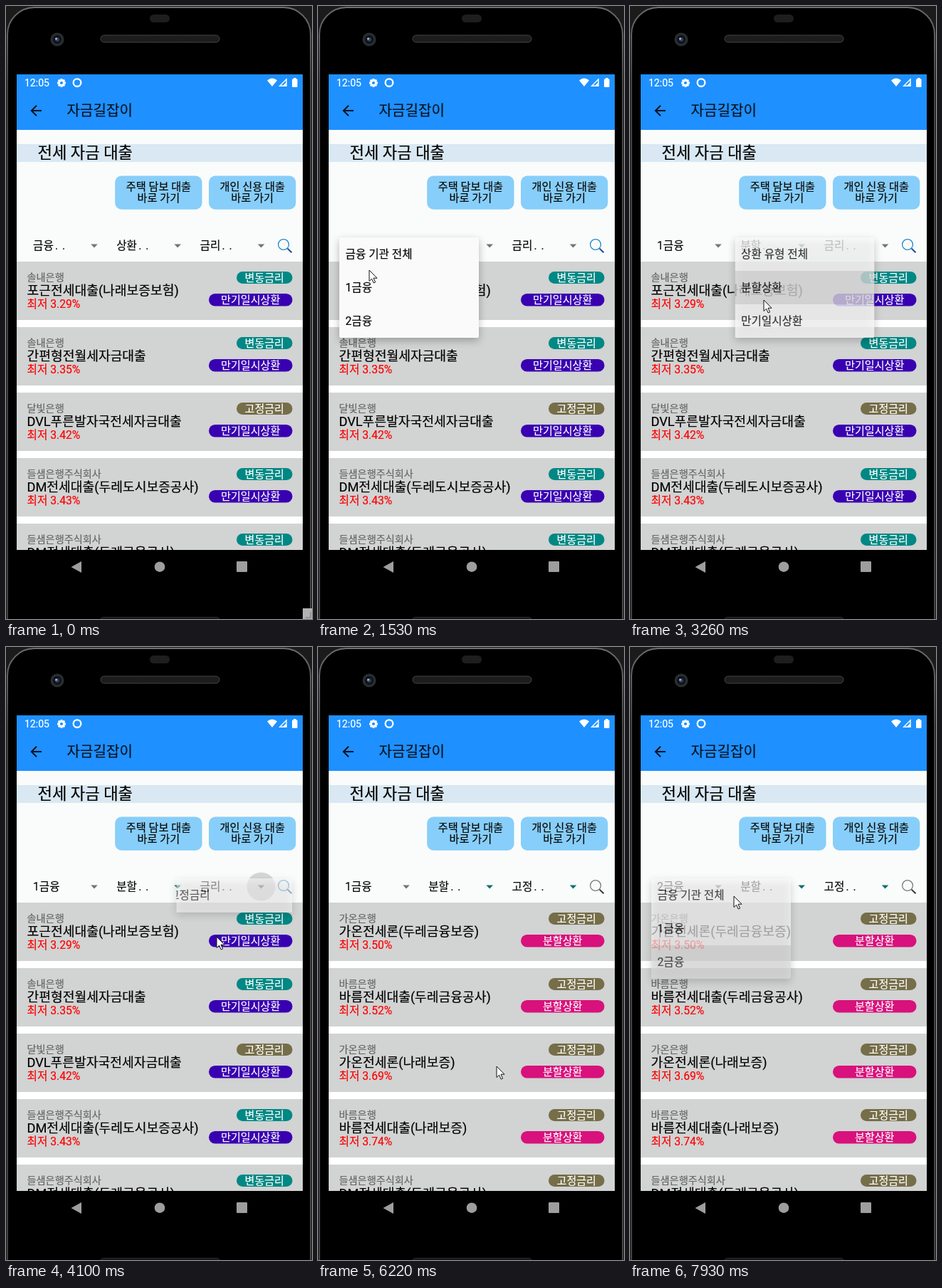
Write an HTML page that moves like this. It is 430 px wide and 861 px high and loops after 8000 ms.

```html
<!DOCTYPE html>
<html lang="ko">
<head>
<meta charset="utf-8">
<title>전세 자금 대출</title>
<style>
html, body { margin: 0; width: 100%; height: 100%; overflow: hidden; background: #000; }
svg { display: block; width: 430px; height: 861px; }
text { font-family: Roboto, 'Noto Sans CJK KR', 'Noto Sans CJK', sans-serif; white-space: pre; stroke-width: .2px; }
#shade { filter: blur(6px); }
</style>
</head>
<body>
<svg id="stage" viewBox="0 0 430 861" xmlns="http://www.w3.org/2000/svg"></svg>
<script>
const LOOP = 8000;
const ROW = 47, TOP = 325;
const SEARCHED = 5210;

const text = (x, y, size, str, fill = '#0a0a0a', anchor = 'start') =>
  `<text x="${x}" y="${y}" font-size="${size}" fill="${fill}" stroke="${fill}" text-anchor="${anchor}">${str}</text>`;
const rect = (x, y, w, h, fill, r = 0, more = '') =>
  `<rect x="${x}" y="${y}" width="${w}" height="${h}" rx="${r}" fill="${fill}" ${more}/>`;
const circle = (x, y, r, fill, more = '') =>
  `<circle cx="${x}" cy="${y}" r="${r}" fill="${fill}" ${more}/>`;
const path = (d, fill, more = '') => `<path d="${d}" fill="${fill}" ${more}/>`;

const RATES = { 변동금리: '#008884', 고정금리: '#756e49' };
const REPAY = { 만기일시상환: '#3900b2', 분할상환: '#d8117c' };

const last = ['들샘은행주식회사', 'DM전세대출(두레금융공사)', '3.45'];
const before = [
  ['솔내은행', '포근전세대출(나래보증보험)', '3.29', '변동금리'],
  ['솔내은행', '간편형전월세자금대출', '3.35', '변동금리'],
  ['달빛은행', 'DVL푸른발자국전세자금대출', '3.42', '고정금리'],
  ['들샘은행주식회사', 'DM전세대출(두레도시보증공사)', '3.43', '변동금리'],
  [...last, '변동금리']
];
const after = [
  ['가온은행', '가온전세론(두레금융보증)', '3.50', '고정금리'],
  ['바름은행', '바름전세대출(두레금융공사)', '3.52', '고정금리'],
  ['가온은행', '가온전세론(나래보증)', '3.69', '고정금리'],
  ['바름은행', '바름전세대출(나래보증)', '3.74', '고정금리'],
  [...last, '고정금리']
];

const card = ([bank, name, rate, kind], i, repay) => `<g transform="translate(0 ${i * 92})">` +
  rect(15, 359, 402, 82, '#d2d3d3') +
  text(29.5, 386, 14.2, bank, '#666') +
  text(29.5, 406, 18.2, name, '#000') +
  text(29.5, 424, 15.7, `최저 ${rate}%`, '#f00') +
  rect(324, 373, 78.5, 17, RATES[kind], 8.5) +
  text(363.2, 387, 15, kind, '#fff', 'middle') +
  rect(285, 404, 117.5, 17.5, REPAY[repay], 8.7) +
  text(343.7, 418, 15.1, repay, '#fff', 'middle') + '</g>';
const cards = (rows, repay) => rows.map((row, i) => card(row, i, repay)).join('');

const button = (x, label) => rect(x, 238.5, 122.3, 47.2, '#87cefa', 9) +
  text(x + 61.2, 259.3, 15.2, label, '#0a0a0a', 'middle') +
  text(x + 61.2, 275, 15.2, '바로 가기', '#0a0a0a', 'middle');

const gear = Array.from({ length: 8 }, (_, i) =>
  rect(76.5, 102, 3, 3, '#fff', .5, `transform="rotate(${i * 45} 78 108)"`)).join('');

const phone =
  rect(0, 0, 430, 861, '#1b1b1b') +
  rect(2, 2, 426, 920, '#000', 38, 'stroke="url(#edge)" stroke-width="2"') +
  rect(202, 12, 28, 11, '#1e1e1e', 5.5) +
  circle(72, 47, 9.5, '#2a2c2f') + circle(72, 47, 6, '#0d121b') +
  circle(72, 47, 3, '#30435c') + circle(70.5, 46, 1.5, '#a9bdd2') +
  rect(133, 41, 167, 10, 'url(#mesh)', 5, 'stroke="#444"') +
  rect(133, 858.5, 167, 8, '#151515', 4, 'stroke="#2c2c2c"') +
  path('M106 780V796L91.5 788Z', '#9e9e9e') +
  circle(216, 787.7, 7.3, '#9e9e9e') + rect(324, 780, 15, 15, '#9e9e9e', 1);

const bar =
  rect(15, 96, 402, 78, '#1e90ff') +
  text(26, 113, 14, '12:05', '#fff') +
  gear + circle(78, 108, 3.4, 'none', 'stroke="#fff" stroke-width="2.6"') +
  circle(100, 107.7, 5.3, 'none', 'stroke="#fff" stroke-width="2.4"') +
  path('M367 104.5Q374 98.5 381 104.5L374 113Z', '#fff') +
  path('M394 103V112.3H384.7Z', 'none', 'stroke="#fff" stroke-width="1.4"') +
  path('M394 107V112H389Z', '#fff') +
  rect(402, 102.5, 7.5, 11.5, '#fff', 1) + rect(404, 101, 3.5, 2, '#fff') +
  path('M50 147H36.5M43 139.8L35.8 147L43 154.2', 'none', 'stroke="#0a1420" stroke-width="2"') +
  text(85.5, 153.8, 20.1, '자금길잡이', '#0a1420');

document.getElementById('stage').innerHTML = `
<defs>
  <clipPath id="screen"><rect x="15" y="96" width="402" height="668"/></clipPath>
  <clipPath id="reveal"><rect id="window"/></clipPath>
  <linearGradient id="edge" x2="0" y2="1">
    <stop stop-color="#6e6e6e"/><stop offset=".12" stop-color="#424242"/>
  </linearGradient>
  <pattern id="mesh" width="3" height="3" patternUnits="userSpaceOnUse">
    <rect width="3" height="3" fill="#222"/><path d="M0 3L3 0" stroke="#111"/>
  </pattern>
</defs>
${phone}
<g clip-path="url(#screen)">
  ${rect(15, 96, 402, 263, '#fafcfb')}${rect(15, 359, 402, 405, '#fff')}
  ${bar}
  ${rect(15, 194, 402, 25, '#d9e8f2')}${text(44.5, 213.7, 22.2, '전세 자금 대출', '#000')}
  ${button(153.2, '주택 담보 대출')}${button(285, '개인 신용 대출')}
  <g id="spinners"></g>
  <g id="before">${cards(before, '만기일시상환')}</g>
  <g id="after">${cards(after, '분할상환')}</g>
  <g id="ripple"></g>
  <g id="popup">
    <rect id="shade" transform="translate(0 4)"/>
    <g id="menu" clip-path="url(#reveal)"></g>
  </g>
</g>
<g id="corner">${rect(417, 846, 13, 15, '#b2b2b2')}${path('M428 851V859H421', 'none', 'stroke="#777"')}</g>
<g id="cursor">${path('M0 0V15.5L3.6 12.2L6.2 18L8.6 17L6 11.2H11Z', '#fff', 'stroke="#111" stroke-linejoin="round"')}</g>`;

const el = id => document.getElementById(id);
const lerp = (a, b, p) => a + (b - a) * p;
const clamp = v => Math.max(0, Math.min(1, v));
const show = (id, on) => el(id).setAttribute('display', on ? 'inline' : 'none');

// Solves the curve (.4, 0, .2, 1) for a given x.
function ease(x) {
  let lo = 0, hi = 1;
  for (let i = 0; i < 20; i++) {
    const s = (lo + hi) / 2, r = 1 - s;
    if (1.2 * r * r * s + .6 * r * s * s + s ** 3 < x) lo = s; else hi = s;
  }
  return 3 * (1 - lo) * lo * lo + lo ** 3;
}

const banks = ['금융 기관 전체', '1금융', '2금융'];
const repays = ['상환 유형 전체', '분할상환', '만기일시상환'];
const rates = ['금리 유형 전체', '고정금리', '변동금리'];

// x: resting left edge; from: left edge of the first sliver; shift: sideways start offset
const menus = [
  { x: 30, from: 30, shift: -39, arrow: 124, rows: banks, pick: 1, open: 960, close: 1850 },
  { x: 147.5, from: 147.5, shift: -39, arrow: 241, rows: repays, pick: 1, open: 2650, close: 3190 },
  { x: 206, from: 248, shift: 18.5, arrow: 358.5, rows: rates, pick: 1, open: 4030, close: 4540 },
  { x: 30, from: 30, shift: -39, arrow: 124, rows: banks, pick: 2, open: 6620, close: 7825 }
];

const moves = [
  [70, 419, 844], [350, 235, 560], [690, 60, 275], [830, 84, 328], [1050, 84, 330],
  [1530, 72, 371], [1590, 72, 371], [1670, 66, 394], [1900, 66, 394],
  [2300, 262, 352], [2560, 205, 330], [2720, 205, 332], [3050, 188, 413], [3400, 188, 413],
  [3800, 312, 336], [4020, 312, 338], [4090, 296, 407], [4600, 296, 407],
  [5000, 388, 343], [5600, 388, 343], [5960, 275, 671], [6190, 275, 671],
  [6220, 251, 589], [6250, 251, 589], [6360, 108, 328], [6700, 108, 330],
  [7250, 90, 436], [7800, 90, 438], [7920, 146, 350], [8000, 146, 350]
];

function place(t) {
  const i = moves.findIndex(m => m[0] > t);
  if (i < 1) return moves[0].slice(1);
  const [t0, x0, y0] = moves[i - 1], [t1, x1, y1] = moves[i];
  const u = (t - t0) / (t1 - t0), p = u * u * (3 - 2 * u);
  return [lerp(x0, x1, p), lerp(y0, y1, p)];
}

function spinner(x, label, dots, tint) {
  const dot = d => text(x + d, 342, 15.65, '.');
  const a = x + 86;
  return text(x, 342, 15.65, label) + (dots ? dot(31) + dot(41) : '') +
    path(`M${a - 4.8} 334.6H${a + 4.8}L${a} 339.6Z`, tint);
}

function drawSpinners(t) {
  const [a, b, c, d] = menus.map(m => t >= m.close);
  const grey = '#747474', teal = '#087072';
  const done = t >= SEARCHED;
  const stroke = (color, w) => `stroke="${color}" stroke-width="${w}"`;
  el('spinners').innerHTML =
    spinner(38, d ? '2금융' : a ? '1금융' : '금융', !a, grey) +
    spinner(155.2, b ? '분할' : '상환', true, b ? teal : grey) +
    spinner(272.5, c ? '고정' : '금리', true, c ? teal : grey) +
    path('M395.6 340.6L401.5 346.3', 'none', stroke(done ? '#333' : '#1c48a4', 2)) +
    circle(390, 335, 7.4, 'none', stroke(done ? '#777' : '#2388c6', 1.3));
}

function drawPopup(t) {
  const m = menus.find(n => t >= n.open - 60 && t < n.close + 300);
  show('popup', m && t >= m.open);
  show('ripple', m && t < m.open + 300);
  if (!m) return;

  const glow = clamp((t - m.open + 60) / 60) * clamp((m.open + 300 - t) / 200);
  el('ripple').innerHTML = circle(m.arrow, 336.5, 20, '#000', `opacity="${.15 * glow}"`);

  const p = ease(clamp((t - m.open) / 300));
  const left = lerp(m.from, m.x, p);
  const right = lerp(m.from + 154, m.x + 196, p);
  const box = { x: left, y: TOP, width: right - left, height: lerp(23.5, ROW * 3, p) };
  for (const id of ['window', 'shade'])
    for (const key in box) el(id).setAttribute(key, box[key]);

  // The shadow fades apart from the sheet, so it darkens a half-clear menu.
  const fade = Math.min(clamp((t - m.open) / 127), 1 - clamp((t - m.close) / 300));
  el('menu').setAttribute('opacity', fade);
  el('shade').setAttribute('opacity', .27 * fade);
  const dx = m.shift * (1 - p), dy = -59 * (1 - p);
  el('menu').innerHTML = rect(left, TOP, right - left, ROW * 3, '#fafafa', 2) +
    `<g transform="translate(${dx} ${dy})">` +
    (t > m.close - 60 ? rect(m.x, TOP + ROW * m.pick, 196, ROW, 'rgba(0,0,0,.11)') : '') +
    m.rows.map((row, i) => text(m.x + 8.5, 354.3 + ROW * i, 15.65, row)).join('') + '</g>';
}

function draw(t) {
  show('before', t < SEARCHED);
  show('after', t >= SEARCHED);
  show('corner', t < 70);
  show('cursor', t >= 70);
  drawSpinners(t);
  drawPopup(t);
  el('cursor').setAttribute('transform', `translate(${place(t)})`);
}

const start = performance.now();
function tick() {
  draw((performance.now() - start) % LOOP);
  requestAnimationFrame(tick);
}
tick();
</script>
</body>
</html>
```
